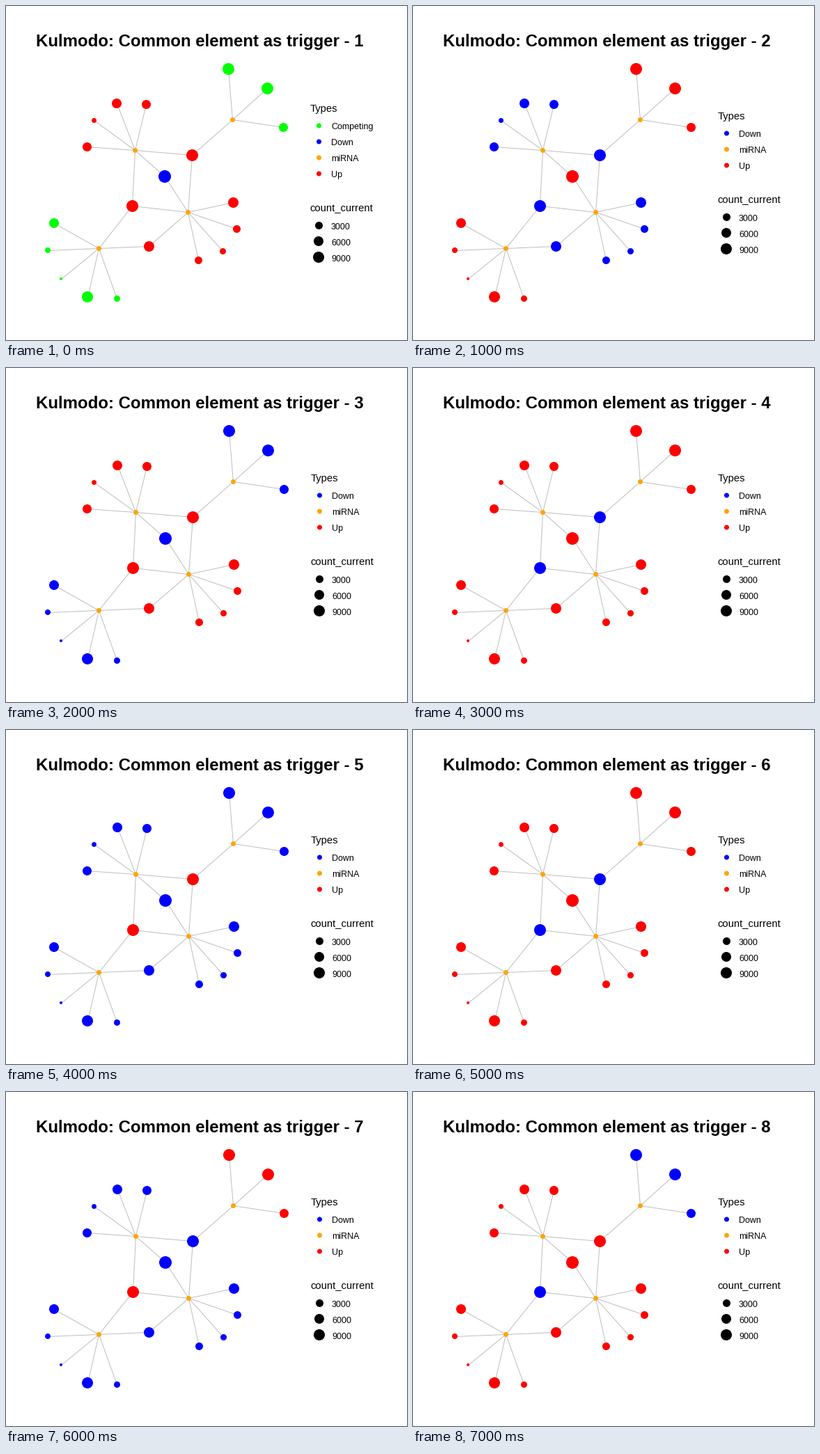
These frames come from a looping animation (576x480 px, 8 s). A matplotlib script:

```python
import matplotlib.pyplot as plt
from matplotlib.animation import FuncAnimation
from matplotlib.patches import Circle

W, H, DPI = 576, 480, 96
STEP_MS = 1000

plt.rcParams["font.family"] = "Liberation Sans"

COLORS = {"Competing": "#00ff00", "Down": "#0000ff",
          "miRNA": "#ffa500", "Up": "#ff0000"}
EDGE = "#bebebe"

# Target genes by group: (x, y, diameter)
GENES = {
    "right": [(320, 90, 17), (376, 118, 17), (399, 174, 13)],
    "top": [(159.6, 140, 14), (201.8, 141, 13), (126, 164, 7), (116, 202, 13)],
    "low": [(327, 282, 15), (332, 320, 11), (312, 352, 9), (277, 365, 11)],
    "left": [(68.6, 312, 14), (60, 351, 8), (79, 392, 4), (117, 418, 16),
             (159.2, 420, 9)],
    "hub": [(268, 214, 17)],
    "mid": [(181.7, 287, 17)],
    "link": [(205.4, 345, 15)],
    "core": [(228.8, 245, 18)],
}

# Each miRNA with the gene groups it binds
MIRNAS = [
    ((326, 163), ("right", "hub")),
    ((185.7, 207), ("top", "hub", "mid", "core")),
    ((262, 296), ("low", "hub", "mid", "link", "core")),
    ((133.3, 348), ("left", "mid", "link")),
]

# Groups that stand out at each step; all others take the second type
STEPS = [
    ({"core": "Down", "right": "Competing", "left": "Competing"}, "Up"),
    (dict.fromkeys(("core", "right", "left"), "Up"), "Down"),
    (dict.fromkeys(("core", "right", "left"), "Down"), "Up"),
    (dict.fromkeys(("hub", "mid"), "Down"), "Up"),
    (dict.fromkeys(("hub", "mid"), "Up"), "Down"),
    (dict.fromkeys(("hub", "mid"), "Down"), "Up"),
    (dict.fromkeys(("right", "mid"), "Up"), "Down"),
    (dict.fromkeys(("right", "mid"), "Down"), "Up"),
]

fig = plt.figure(figsize=(W / DPI, H / DPI), dpi=DPI, facecolor="white")
ax = fig.add_axes([0, 0, 1, 1])


def dot(x, y, size, color):
    # Odd diameters sit on pixel centres, even ones on pixel corners
    shift = size % 2 / 2
    ax.add_patch(Circle((x + shift, y + shift), size / 2, facecolor=color,
                        linewidth=0, zorder=2))


def label(x, y, text, px, **style):
    ax.text(x, y, text, fontsize=px * 72 / DPI, color="black",
            ha="left", va="baseline", **style)


def draw_network(special, default, squeeze):
    def fit(x):
        return round(60 + (x - 60) * squeeze)

    for (mx, my), groups in MIRNAS:
        for group in groups:
            for x, y, _ in GENES[group]:
                ax.plot([fit(mx) + 0.5, fit(x) + 0.5], [my + 0.5, y + 0.5],
                        color=EDGE, linewidth=72 / DPI, zorder=1)
        dot(fit(mx), my, 7, COLORS["miRNA"])
    for group, genes in GENES.items():
        color = COLORS[special.get(group, default)]
        for x, y, size in genes:
            dot(fit(x), y, size, color)


def draw_legend(types, x, top):
    label(x - 0.5, top, "Types", 14.7)
    y = top + 20
    for name in types:
        dot(x + 12, y - 0.5, 7, COLORS[name])
        label(x + 30, y + 5, name, 12.5)
        y += 23
    y += 32
    label(x - 0.5, y - 1, "count_current", 14.8)
    for i, size in enumerate((11, 14, 16)):
        row = y + 19 + 23 * i
        dot(x + 12, row, size, "black")
        label(x + 30, row + 6, str(3000 * (i + 1)), 12.5)


def draw(step):
    ax.clear()
    ax.set_xlim(0, W)
    ax.set_ylim(H, 0)
    ax.axis("off")
    special, default = STEPS[step]
    wide = "Competing" in special.values()
    types = [t for t in COLORS if wide or t != "Competing"]
    draw_network(special, default, 0.997 if wide else 1)
    draw_legend(types, 437 if wide else 438, 152 if wide else 163)
    label(43, 58, f"Kulmodo: Common element as trigger - {step + 1}", 24,
          weight="bold")
    return []


anim = FuncAnimation(fig, draw, frames=len(STEPS), init_func=lambda: [],
                     interval=STEP_MS, repeat=True, repeat_delay=0)
plt.show()
```
